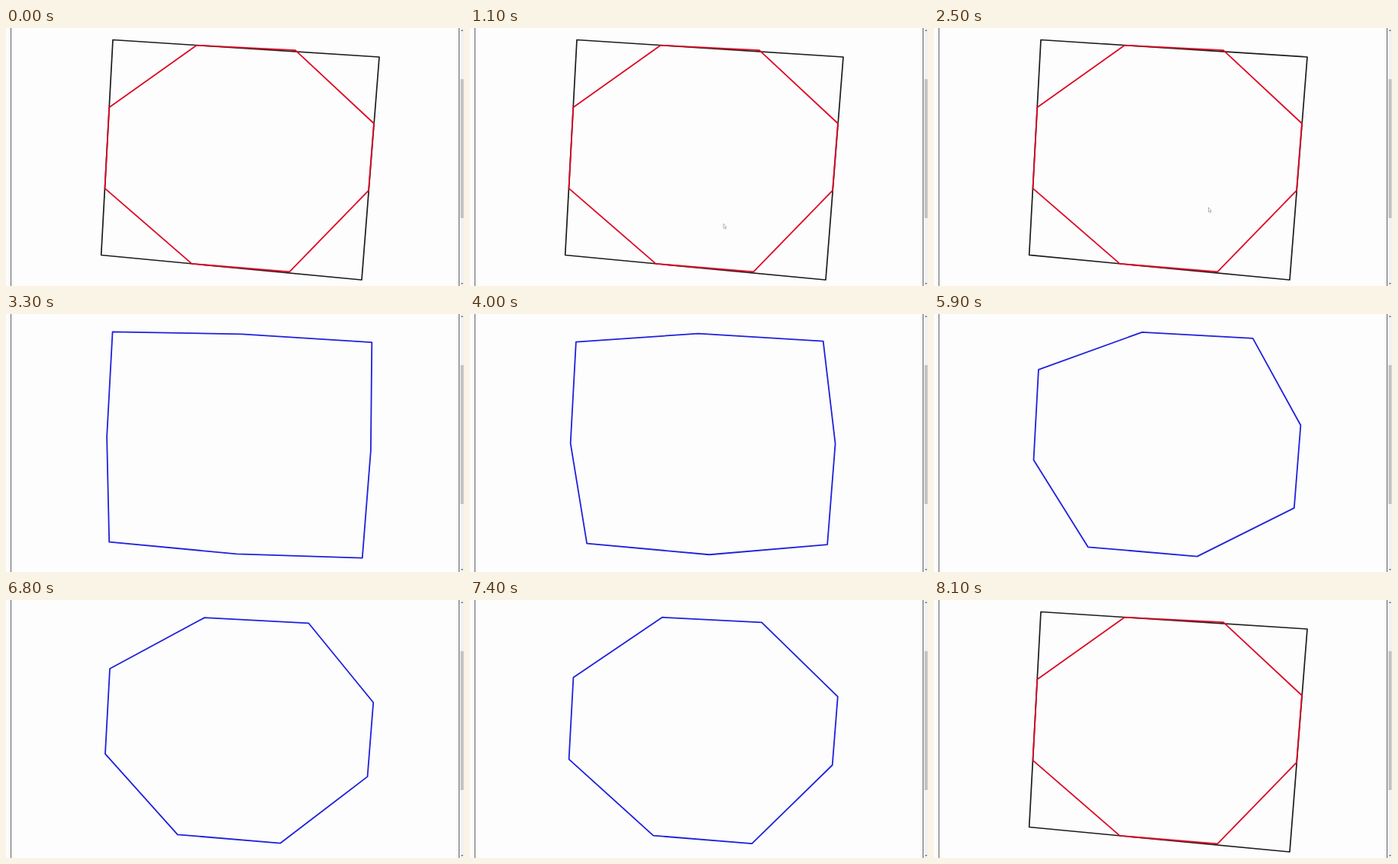
Animation, 600 px wide and 338 px high, one loop 8.2 s. Source, as an HTML page:

```html
<!DOCTYPE html>
<html>
<head>
<meta charset="utf-8">
<style>
html, body { margin: 0; height: 100%; overflow: hidden; background: #fdfdfd; }
svg { display: block; }
</style>
</head>
<body>
<svg width="600" height="338" viewBox="0 0 600 338">
  <path d="M6.5 0V338M593.5 0V338" stroke="#606060" />
  <rect x="594" width="6" height="338" fill="#f1f1f1" />
  <rect x="595.5" y="67" width="4" height="182" fill="#c1c1c1" />
  <path d="M596 4l1.5-2 1.5 2zM596 334l1.5 2 1.5-2z" fill="#666" />
  <g fill="none" stroke-linejoin="round">
    <polygon id="quad" stroke="#1c1c1c" stroke-width="1.7" />
    <polygon id="ring" stroke-width="1.8" />
  </g>
  <path id="cursor" d="M0 0V6L1.4 4.8 2.4 7 3.3 6.6 2.4 4.5H4z" fill="#fff" stroke="#888" stroke-width=".6" />
</svg>
<script>
const LOOP = 8200, STEP = 100;
const MORPH_ON = 2800, MORPH_OFF = 7600, MORPH_START = 2890, MORPH_TIME = 4640;
const TILT = .014;
// Clockwise corners, each with the two final cuts along the edge that follows
const edges = [
  { corner: [140, 15.5], cuts: [.315, .685] },
  { corner: [489, 38], cuts: [.309, .61] },
  { corner: [466, 330], cuts: [.277, .652] },
  { corner: [124.7, 297.5], cuts: [.316, .692] },
];

const $ = id => document.getElementById(id);
const quad = $("quad"), ring = $("ring"), cursor = $("cursor");
const clamp = x => Math.min(1, Math.max(0, x));
const lerp = (a, b, p) => a + (b - a) * p;
const mix = (a, b, p) => a.map((v, i) => lerp(v, b[i], p));

quad.setAttribute("points", edges.map(e => e.corner).join(" "));

// The cuts slide from each edge's midpoint and end corner to their final places
function ringPoints(p) {
  return edges.flatMap(({ corner, cuts }, i) => {
    const next = edges[(i + 1) % 4].corner;
    return [.5, 1].map((from, k) => {
      const [x, y] = mix(corner, next, lerp(from, cuts[k], p));
      return [x, y - TILT * p * (x - 250)];
    });
  });
}

function draw(now) {
  const t = Math.floor(now % LOOP / STEP) * STEP;
  const morphing = t >= MORPH_ON && t < MORPH_OFF;
  const p = morphing ? clamp((t - MORPH_START) / MORPH_TIME) : 1;
  ring.setAttribute("points", ringPoints(p).join(" "));
  ring.setAttribute("stroke", morphing ? "#2020dc" : "#dc0a26");
  quad.style.display = morphing ? "none" : "";

  const glide = 1 - (1 - clamp((t - 400) / 1700)) ** 3;
  cursor.style.display = t < MORPH_ON ? "" : "none";
  cursor.setAttribute("transform", `translate(${mix([225, 340], [359.5, 235], glide)})`);
}

const begin = performance.now();
function tick() {
  draw(performance.now() - begin);
  requestAnimationFrame(tick);
}
tick();
</script>
</body>
</html>
```
